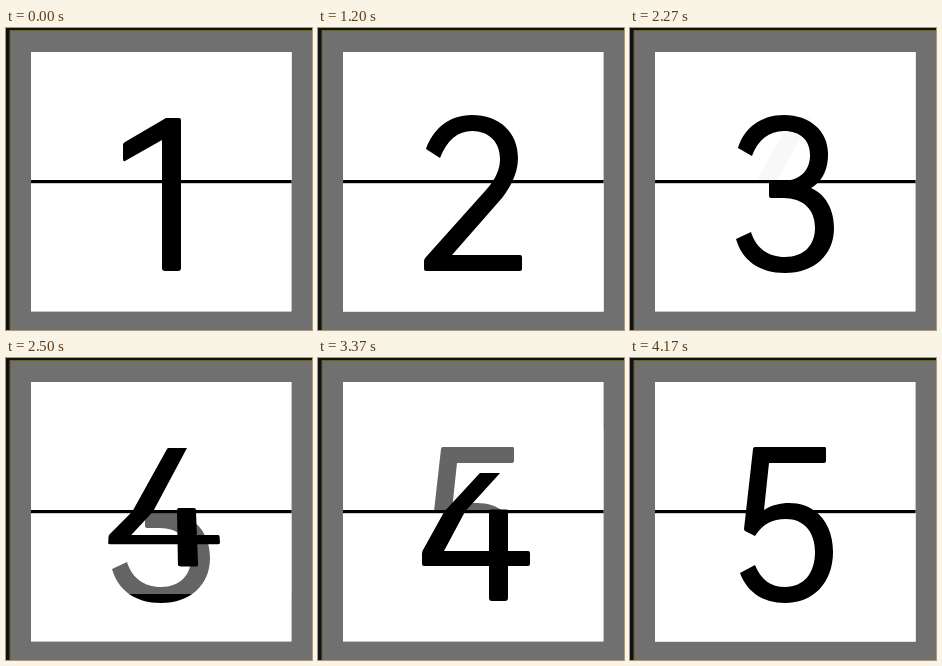
These frames come from a looping animation (306x302 px, 4.2 s). An HTML page:

```html
<!DOCTYPE html>
<html lang="en">
<head>
<meta charset="utf-8">
<title>Flip counter</title>
<style>
html, body { margin: 0; width: 100%; height: 100%; overflow: hidden; background: #101010; }
svg { display: block; width: 306px; height: 302px; }
</style>
</head>
<body>
<svg viewBox="0 0 306 302">
  <defs>
    <clipPath id="top"><rect x="25" y="24" width="260.6" height="129.5"/></clipPath>
    <clipPath id="bottom"><rect x="25" y="153.5" width="260.6" height="130"/></clipPath>
  </defs>
  <rect width="306" height="302" fill="#101010"/>
  <rect x="3.5" y="2" width="303" height="300" fill="#62622a"/>
  <rect x="4.5" y="3" width="302" height="299" fill="#707070"/>
  <rect x="25" y="24" width="260.6" height="259.6" fill="#fff"/>
  <g clip-path="url(#top)"><path id="upper"/></g>
  <g clip-path="url(#bottom)"><path id="lower"/></g>
  <g id="half"><path id="card" fill="#fff"/><path id="flap"/></g>
  <rect x="25" y="152" width="260.6" height="3.2"/>
</svg>
<script>
const LOOP = 4200, FIRST = 267, STEP = 994, FLIP = 600;
const CX = 155.5, HINGE = 153.5, DEPTH = 1250;

const sheet = 'M25 24 L286 24 L286 284 L25 284 Z';
const digits = [
  'M160 90 L173 90 Q175 90 175 92 L175 240 Q175 243 172 243 L159 243 Q156 243 156 240 L156 112 L119 133 Q117 134 117 131 L117 117 Q117 115 119 114 Z',
  'M108 121 C115 101 131 87 154 87 C181 87 200 104 200 130 C200 145 193 158 184 170 L134 227 L202 227 Q204 227 204 229 L204 241 Q204 243 202 243 L108 243 Q106 243 106 241 L106 233 Q106 231 108 229 L168 162 C177 152 182 142 182 131 C182 114 171 103 154 103 C140 103 129 112 122 130 Z',
  'M108 120 C114 100 131 87 154 87 C180 87 198 103 198 126 C198 141 193 153 181 160 C195 166 204 181 204 200 C204 227 184 245 155 245 C129 245 112 232 106 211 L121 204 C126 220 138 229 155 229 C174 229 185 217 185 200 C185 181 173 170 153 170 L141 170 Q139 170 139 168 L139 155 Q139 153 141 153 L151 153 C170 153 180 143 180 127 C180 112 170 103 154 103 C139 103 128 112 122 128 Z',
  'M162 90 L181 90 L126 193 L171 193 L171 152 Q171 150 173 150 L188 150 Q190 150 190 152 L190 193 L210 193 Q212 193 212 195 L212 206 Q212 208 210 208 L190 208 L190 240 Q190 243 187 243 L174 243 Q171 243 171 240 L171 208 L106 208 Q104 208 104 206 L104 196 Q104 194 105 192 L161 91 Z',
  'M125 89 L195 89 Q196 89 196 91 L196 103 Q196 105 194 105 L139 105 L134 152 C142 147 150 145 159 145 C186 145 203 165 203 194 C203 225 183 245 155 245 C133 245 117 234 110 215 L125 207 C131 222 141 229 155 229 C174 229 185 215 185 194 C185 174 174 161 156 161 C142 161 133 166 125 178 L115 173 Q114 172 114 171 L123 91 Q123 89 125 89 Z'
];

const [upper, lower, card, flap, half] =
  ['upper', 'lower', 'card', 'flap', 'half'].map(id => document.getElementById(id));

// cubic-bezier(.25, .1, .25, 1)
function ease(x) {
  let lo = 0, hi = 1;
  for (let i = 0; i < 24; i++) {
    const s = (lo + hi) / 2;
    if (0.75 * s * (1 - s) + s ** 3 < x) lo = s; else hi = s;
  }
  const s = lo, r = 1 - s;
  return 0.3 * s * r * r + 3 * s * s * r + s ** 3;
}

// Turns an outline about the hinge; side is -1 for the top half, 1 for the bottom.
function turn(outline, angle, side) {
  const c = Math.abs(Math.cos(angle)), z = Math.sin(angle);
  return outline.replace(/(\d+) (\d+)/g, (_, x, y) => {
    const dy = y - HINGE, k = DEPTH / (DEPTH - side * dy * z);
    return (CX + (x - CX) * k).toFixed(2) + ' ' + (HINGE + dy * c * k).toFixed(2);
  });
}

function draw(t) {
  const n = Math.min(3, Math.floor((t - FIRST) / STEP));
  const p = n < 0 ? 0 : ease(Math.min(1, (t - FIRST - n * STEP) / FLIP));
  const from = digits[Math.max(0, n)], to = digits[Math.max(0, n) + 1];
  const falling = p < 0.5, side = falling ? -1 : 1, angle = Math.PI * p;
  upper.setAttribute('d', to);
  lower.setAttribute('d', from);
  // The moving sheet is clear when it stands on edge and solid when it lies flat.
  card.setAttribute('d', turn(sheet, angle, side));
  card.setAttribute('opacity', Math.abs(1 - 2 * p));
  flap.setAttribute('d', turn(falling ? from : to, angle, side));
  half.setAttribute('clip-path', falling ? 'url(#top)' : 'url(#bottom)');
}

const start = performance.now();
function tick(now) {
  draw(Math.max(0, now - start) % LOOP);
  requestAnimationFrame(tick);
}
draw(0);
requestAnimationFrame(tick);
</script>
</body>
</html>
```
